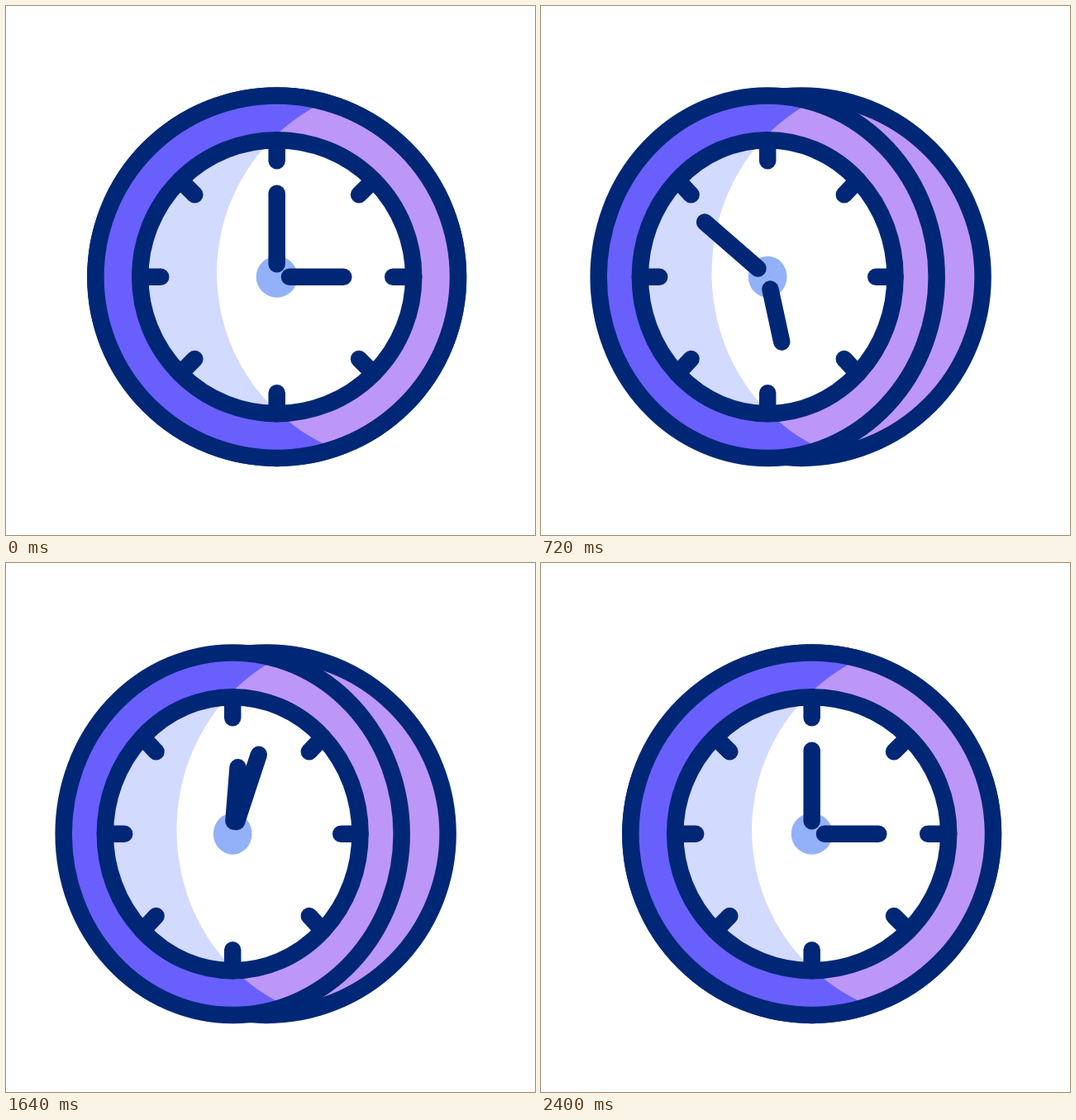
Recreate the animation shown at these times as an HTML page with a canvas. Size 640 by 640 pixels, loop 2420 ms.

```html
<!DOCTYPE html>
<html lang="en">
<head>
<meta charset="utf-8">
<title>Clock</title>
<style>
  html, body { margin: 0; width: 100%; height: 100%; overflow: hidden; background: #fff; }
  canvas { display: block; width: 640px; height: 640px; }
</style>
</head>
<body>
<canvas id="stage" width="640" height="640"></canvas>
<script>
const ctx = document.getElementById('stage').getContext('2d');

const LOOP = 2420, STEP = 20, SPIN = 2400, TURN = 400;
const CENTER = 327.68, RIM = 219.3, DIAL = 165.5, STROKE = 20.5;
const NAVY = '#002776', PURPLE = '#695ffd', LILAC = '#bc97f7';
const SHADE = '#d2dafe', WHITE = '#fff', HUB = '#93b1f8';

const smooth = u => {
  u = Math.min(1, Math.max(0, u));
  return u * u * (3 - 2 * u);
};

function ellipse(x, y, rx, ry) {
  ctx.beginPath();
  ctx.ellipse(x, y, rx, ry, 0, 0, Math.PI * 2);
}

// Disc whose lit part is cut by a large offset circle.
function shadedDisc(cx, squash, radius, dark, light) {
  ctx.save();
  ellipse(cx, CENTER, radius * squash, radius);
  ctx.fillStyle = dark;
  ctx.fill();
  ctx.clip();
  ellipse(cx + 157 * squash, CENTER - 4.7, 229.6 * squash, 229.6);
  ctx.fillStyle = light;
  ctx.fill();
  ctx.restore();
  ellipse(cx, CENTER, radius * squash, radius);
  ctx.stroke();
}

// Radial line; the angle runs clockwise from twelve o'clock.
function spoke(cx, squash, degrees, from, to) {
  const a = degrees * Math.PI / 180;
  const dx = Math.sin(a) * squash, dy = -Math.cos(a);
  ctx.beginPath();
  ctx.moveTo(cx + dx * from, CENTER + dy * from);
  ctx.lineTo(cx + dx * to, CENTER + dy * to);
  ctx.stroke();
}

function draw(t) {
  const turn = smooth(Math.min(t, SPIN - t) / TURN);
  const spin = smooth(t / SPIN);
  const squash = 1 - 0.0675 * turn;
  const cx = CENTER - 53.5 * turn;

  ctx.fillStyle = WHITE;
  ctx.fillRect(0, 0, 640, 640);
  ctx.strokeStyle = NAVY;
  ctx.lineWidth = STROKE;
  ctx.lineCap = 'round';

  ellipse(CENTER - 12.4 * turn, CENTER, RIM, RIM);
  ctx.fillStyle = LILAC;
  ctx.fill();
  ctx.stroke();

  shadedDisc(cx, squash, RIM, PURPLE, LILAC);
  shadedDisc(cx, squash, DIAL, SHADE, WHITE);
  for (let a = 0; a < 360; a += 45) spoke(cx, squash, a, 140.5, DIAL);

  ellipse(cx, CENTER, 25 * squash, 25);
  ctx.fillStyle = HUB;
  ctx.fill();

  spoke(cx, 1, 1440 * spin, 15.5, 100.9);
  spoke(cx, 1, 90 + 360 * spin, 15.3, 80.6);
}

function tick() {
  const t = performance.now() % LOOP;
  draw(Math.floor(t / STEP) * STEP);
  requestAnimationFrame(tick);
}
tick();
</script>
</body>
</html>
```
